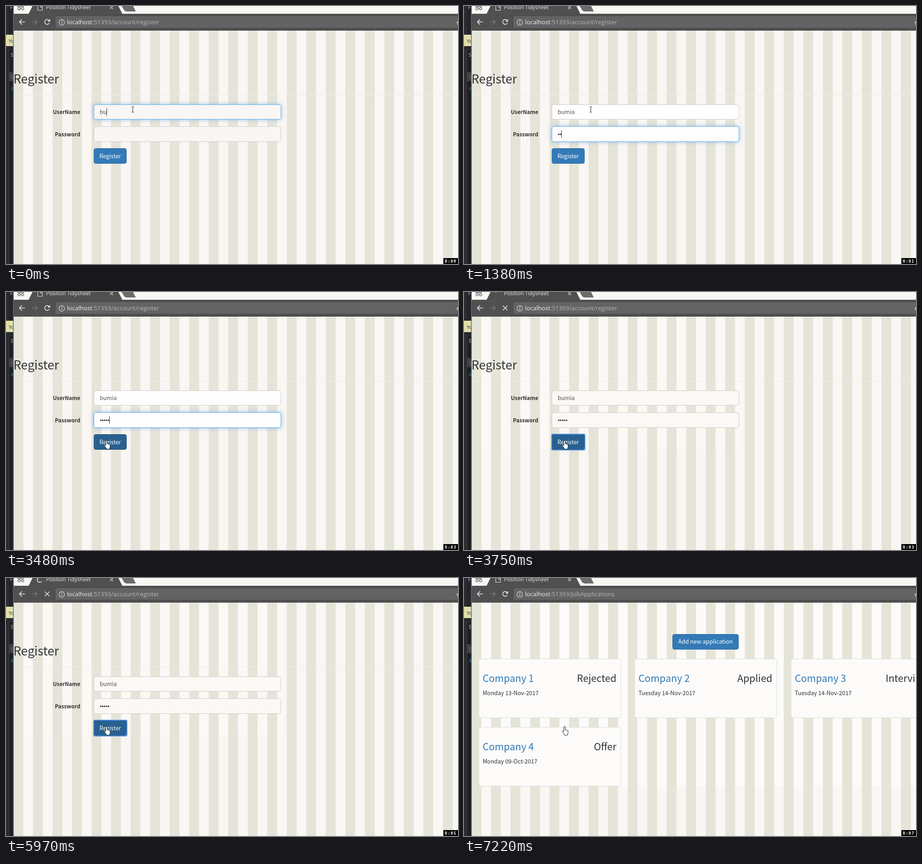
Write an HTML page with a canvas that moves like this. It is 989 px wide and 566 px high and loops after 8 s.

```html
<!DOCTYPE html>
<html lang="en">
<head>
<meta charset="utf-8">
<title>Register</title>
<style>
  html, body { margin: 0; width: 100%; height: 100%; overflow: hidden; background: #f9f6f3; }
  canvas { display: block; }
</style>
</head>
<body>
<canvas id="stage" width="989" height="566"></canvas>
<script>
const ctx = document.getElementById('stage').getContext('2d');
const LOOP = 8000, SUBMIT = 3630, LOADED = 6100;
const PAGE = '"Noto Sans CJK JP", "Noto Sans CJK SC", "Noto Sans CJK", "Source Sans Pro", sans-serif';
const UI = '"Open Sans", "Noto Sans", sans-serif';
const HAND = new Path2D('M4.5 12V2a1.5 1.5 0 0 1 3 0v6l5 1.2q1.2 .4 1.2 2v3q0 1.5-1 4v1.5h-7v-1.5l-4-5.5q-1-1.6.2-2.4t2.6 1.7z');
const ARROW = new Path2D('M.5 .5V13l2.8-2.6 2 4.4 2-.9-2-4.3h3.8z');
const BEAM = new Path2D('M-2.5-6h2l.5.5.5-.5h2M0-5.5v11M-2.5 6h2l.5-.5.5.5h2');

const clamp = v => Math.max(0, Math.min(1, v));
const passed = (t, ...times) => times.filter(x => t >= x).length;

function rect(x, y, w, h, color) {
  ctx.fillStyle = color;
  ctx.fillRect(x, y, w, h);
}

function text(str, x, y, size, color, { font = PAGE, weight = 400, align = 'left' } = {}) {
  ctx.font = `${weight} ${size}px ${font}`;
  ctx.textAlign = align;
  ctx.fillStyle = color;
  ctx.fillText(str, x, y);
  return ctx.measureText(str).width;
}

function box(x, y, w, h, fill, border, radius = 4) {
  ctx.beginPath();
  ctx.roundRect(x + .5, y + .5, w - 1, h - 1, radius);
  ctx.fillStyle = fill;
  ctx.fill();
  ctx.strokeStyle = border;
  ctx.lineWidth = 1;
  ctx.stroke();
}

function poly(color, ...pts) {
  ctx.beginPath();
  for (let i = 0; i < pts.length; i += 2) ctx.lineTo(pts[i], pts[i + 1]);
  ctx.fillStyle = color;
  ctx.fill();
}

function line(d, color, width = 1) {
  ctx.strokeStyle = color;
  ctx.lineWidth = width;
  ctx.stroke(new Path2D(d));
}

function arc(x, y, r, from, to, color, width) {
  ctx.beginPath();
  ctx.arc(x, y, r, from * Math.PI / 180, to * Math.PI / 180);
  ctx.strokeStyle = color;
  ctx.lineWidth = width;
  ctx.stroke();
}

function editorEdge() {
  rect(0, 0, 16, 566, '#252528');
  rect(0, 0, 6, 566, '#2d2d30');
  rect(6, 95, 10, 471, '#1f1f22');
  line('M6.5 95V566M6 95.5H16', '#3c3c40');
  rect(0, 63, 16, 25, '#e3dfaa');
  rect(6, 145, 10, 20, '#3f3f44');
  ctx.save();
  ctx.beginPath();
  ctx.rect(0, 0, 16, 566);
  ctx.clip();
  const opt = { font: UI };
  text('F', 9, 7, 11, '#a9c7e0', opt);
  text('Yo', 6, 81, 11, '#333', opt);
  text('S', 10, 111, 11, '#ccc', opt);
  text('S', 11, 160, 11, '#77777c', opt);
  text('a', 11, 184, 11, '#2f9bdc', opt);
  ctx.restore();
  rect(15.5, 0, 1.5, 566, '#1c86c8');
}

function throbber(t) {
  const mid = -90 - 360 * (t - 3535) / 1789;
  const half = 15 + 85 * clamp((t - 4430) / 1540);
  arc(74, 4, 5.5, mid - half, mid + half, '#dedede', 1.8);
}

function browser(t, loading, path) {
  rect(17, 0, 972, 18, '#f9f7f4');
  rect(17, 17, 972, 37, '#505050');
  poly('#505050', 49, 18, 58, 0, 246, 0, 255, 18);
  poly('#6b6b6b', 253, 0, 278, 0, 284, 12, 263, 12, 259, 10);
  rect(17, 53, 972, 1, '#444');

  line('M25 1.5H39', '#555', 1.5);
  arc(28.5, 6, 2.5, 0, 360, '#555', 1.2);
  arc(36.5, 6, 2.5, 0, 360, '#555', 1.2);
  line('M31 5.5h3', '#555');

  if (loading) throbber(t);
  else line('M69.5 0V9.5H79.5V2L77.5 0M75.5 0V2.5H79', '#ddd', 1.2);
  text('Position Tidysheet', 87.5, 7, 11.5, '#ededed', { font: UI });
  line('M227.5 0l7 7m0-7l-7 7', '#c8c8c8', 1.3);

  line('M41.5 35H29.5M35 29.3L29.3 35 35 40.7', '#e4e4e4', 1.7);
  line('M56.5 35H68.5M63 29.3L68.7 35 63 40.7', '#747474', 1.7);
  if (loading) line('M85 30l10 10m0-10l-10 10', '#e4e4e4', 1.7);
  else {
    arc(90, 35, 5.3, 25, 315, '#e4e4e4', 1.7);
    poly('#e4e4e4', 96.5, 28.5, 96.5, 34.3, 90.7, 34.3);
  }

  box(107, 21, 900, 28, '#636363', '#454545', 3);
  arc(122, 36, 6, 0, 360, '#d0d0d0', 1.3);
  rect(121.3, 35, 1.5, 4, '#d0d0d0');
  rect(121.3, 32.3, 1.5, 1.5, '#d0d0d0');
  const w = text('localhost', 133.5, 40, 13.2, '#f4f4f4', { font: UI });
  text(':51393/' + path, 133.5 + w, 40, 13.2, '#b8b8b8', { font: UI });
  poly('#d0d0d0', 985, 35, 989, 34, 989, 40, 987, 41, 988, 37.5);
}

function stripes(lightRight, lightBottom, light) {
  rect(17, 54, 972, 512, '#f9f6f3');
  rect(17, 54, lightRight - 17, lightBottom - 54, light);
  for (let x = 16.4; x < 989; x += 42.71) {
    const left = Math.max(17, x);
    rect(left, 54, x + 21.5 - left, 512, '#e5e4d8');
  }
}

function input(y, h, fill, focus) {
  if (focus > 0) {
    ctx.save();
    ctx.shadowColor = `rgba(102,175,233,${.7 * focus})`;
    ctx.shadowBlur = 8;
    box(192, y, 410, h, fill, '#ccc');
    ctx.restore();
  }
  box(192, y, 410, h, fill, '#ccc');
  ctx.globalAlpha = focus;
  if (focus > 0) box(192, y, 410, h, fill, '#66afe9');
  ctx.globalAlpha = 1;
}

const caret = (x, y) => rect(Math.round(x), y, 1, 17, '#333');

function registerPage(t) {
  const sent = t >= SUBMIT;
  const tone = sent ? '#fbf8f5' : '#f9f6f3';
  stripes(606, 346, tone);
  rect(17, 195, 972, 1, '#eee');
  text('Register', 16.2, 170, 26.5, '#333');
  text('UserName', 162.5, 237, 11.7, '#333', { weight: 700, align: 'right' });
  text('Password', 162.5, 285.5, 11.7, '#333', { weight: 700, align: 'right' });

  const fill = sent ? tone : t < 830 ? '#f9f6f3' : '#fefefe';
  const moved = clamp((t - 720) / 220);
  input(216, 33, fill, 1 - moved);
  input(264, 34, fill, moved * (1 - clamp((t - SUBMIT) / 100)));

  const typed = 'bumia'.slice(0, 2 + passed(t, 130, 270, 520));
  const w = text(typed, 205, 237, 12.5, '#555');
  if (t < 680) caret(205 + w, 224);

  const dots = passed(t, 1070, 1380, 1780, 1890, 2150);
  for (let i = 0; i < dots; i++) {
    ctx.beginPath();
    ctx.arc(207.3 + 4.27 * i, 281.5, 1.75, 0, 7);
    ctx.fillStyle = '#444';
    ctx.fill();
  }
  const blinkOff = t >= 2710 && t < 3350;
  if (t >= 680 && !sent && !blinkOff) caret(204.7 + 4.27 * dots, 272);

  const hover = t >= 3350;
  box(192, 312, 72, 34, hover ? '#286090' : '#337ab7', hover ? '#204d74' : '#2e6da4');
  if (sent) {
    ctx.beginPath();
    ctx.roundRect(192, 312, 72.5, 34.5, 2);
    ctx.strokeStyle = '#4b8de0';
    ctx.lineWidth = 2;
    ctx.stroke();
  }
  text('Register', 204.5, 333.5, 12.5, '#fff');
}

function card(x, y, n, status, date) {
  box(x, y, 312, 130, '#fcfbf9', '#dcdcdc');
  text('Company ' + n, x + 8.7, y + 51, 21.4, '#337ab7');
  text(status, x + 301.5, y + 51, 21.4, '#333', { align: 'right' });
  text(date, x + 8.7, y + 79.5, 12.5, '#333');
}

function listPage() {
  stripes(989, 457, '#fcfbf9');
  box(456, 123, 145, 34, '#337ab7', '#2e6da4');
  text('Add new application', 528.5, 144, 12.5, '#fff', { align: 'center' });
  card(32, 177, 1, 'Rejected', 'Monday 13-Nov-2017');
  card(373, 177, 2, 'Applied', 'Tuesday 14-Nov-2017');
  card(715, 177, 3, 'Interview', 'Tuesday 14-Nov-2017');
  card(32, 327, 4, 'Offer', 'Monday 09-Oct-2017');
}

function pointer(t) {
  const [path, x, y] =
    t < 2860 ? [BEAM, 277.5, 227] :
    t < 2980 ? [ARROW, 225, 252] :
    t < 3080 ? [ARROW, 189, 268] :
    t < 3200 ? [ARROW, 193, 297] :
    t < 3350 ? [HAND, 207, 321] : [HAND, 214, 325];
  ctx.save();
  ctx.translate(x, y);
  ctx.fillStyle = '#fff';
  if (path !== BEAM) ctx.fill(path);
  ctx.strokeStyle = '#222';
  ctx.lineWidth = 1;
  ctx.stroke(path);
  ctx.restore();
}

function clock(t) {
  rect(957, 553, 32, 13, '#000');
  const seconds = passed(t, 1070, 2000, 3080, 4100, 5180, 6250, 7220);
  ctx.letterSpacing = '1px';
  text('0:0' + seconds, 960, 562.5, 9, '#fff', { font: '"DejaVu Sans Mono", monospace', weight: 700 });
  ctx.letterSpacing = '0px';
}

function draw(t) {
  const done = t >= LOADED;
  editorEdge();
  if (done) listPage();
  else registerPage(t);
  browser(t, t >= SUBMIT && !done, done ? 'JobApplications' : 'account/register');
  pointer(t);
  clock(t);
}

const start = performance.now();
function frame() {
  draw((performance.now() - start) % LOOP);
  requestAnimationFrame(frame);
}
frame();
</script>
</body>
</html>
```
